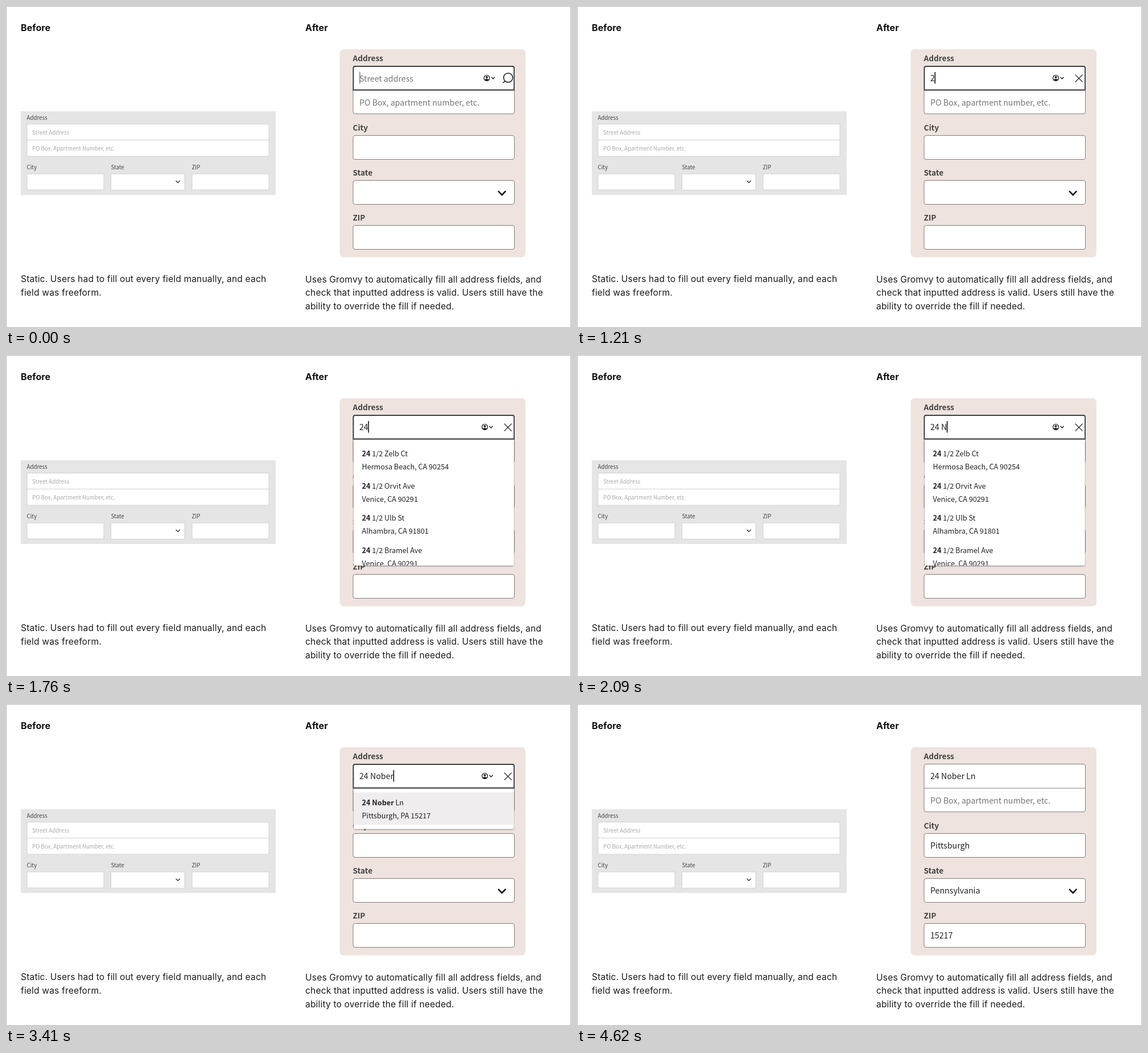
An HTML page for the animation above (7.59 s loop, 993 by 564 pixels).

```html
<!DOCTYPE html>
<html lang="en">
<head>
<meta charset="utf-8">
<title>Address form, before and after</title>
<style>
  html, body { margin: 0; width: 100%; height: 100%; overflow: hidden; background: #fff; }
  svg { display: block; width: 993px; height: 564px; }
  text { white-space: pre; }
  .copy { font: 15.6px/1 Inter, sans-serif; letter-spacing: .15px; fill: #1c1c1c; }
  .head { font: 700 16px/1 Inter, sans-serif; letter-spacing: .1px; fill: #111; }
  .form { font-family: "Noto Sans CJK JP", "Noto Sans CJK SC", "Noto Sans", sans-serif; font-size: 14.2px; fill: #222; }
  .label { font-weight: 500; fill: #444; }
  .wide { font-size: 13.6px; }
  .hint { fill: #757575; }
  .small { font-size: 9.7px; }
  .small .hint { fill: #a9a9a9; }
  .list { font-size: 12.65px; }
  .b { font-weight: 700; }
  .box { fill: #fff; stroke: #857c7a; }
  .pale { fill: #fff; stroke: #d2d2d2; }
  .line { fill: none; stroke: #111; }
</style>
</head>
<body>
<svg viewBox="0 0 993 564">
  <defs>
    <clipPath id="clip"><rect id="clipBox" x="611" y="149" width="281.5" height="221"/></clipPath>
    <filter id="shade" x="-5%" y="-5%" width="110%" height="112%">
      <feDropShadow dx="0" dy="1" stdDeviation="1" flood-opacity=".45"/>
    </filter>
  </defs>
  <rect width="993" height="564" fill="#fff"/>
  <path d="M.5 564V.5H992.5V564" fill="none" stroke="#b9b9b9"/>

  <text class="head" x="26" y="43.8">Before</text>
  <text class="head" x="526" y="43.8">After</text>
  <g class="copy">
    <text x="26" y="485">Static. Users had to fill out every field manually, and each</text>
    <text x="26" y="508.5">field was freeform.</text>
    <text x="526" y="485.5">Uses Gromvy to automatically fill all address fields, and</text>
    <text x="526" y="509">check that inputted address is valid. Users still have the</text>
    <text x="526" y="532.5">ability to override the fill if needed.</text>
  </g>

  <g class="form small">
    <rect x="26" y="185" width="448" height="147" fill="#e5e5e5"/>
    <rect class="pale" x="37" y="207.5" width="425" height="56.5"/>
    <path class="pale" d="M37 235.5H462"/>
    <rect class="pale" x="37" y="295" width="135" height="28"/>
    <rect class="pale" x="184.5" y="295" width="129.5" height="28.5"/>
    <rect class="pale" x="327" y="295" width="135" height="28"/>
    <path class="line" stroke-width="1.2" d="M298.5 306.8l3.6 3.6 3.6-3.6"/>
    <g class="label">
      <text x="36.5" y="199.5">Address</text>
      <text x="36.5" y="287">City</text>
      <text x="184.5" y="287">State</text>
      <text x="326.5" y="287">ZIP</text>
    </g>
    <text class="hint" x="46" y="225.5">Street Address</text>
    <text class="hint" x="46" y="254">PO Box, Apartment Number, etc.</text>
  </g>

  <g class="form">
    <rect x="586.5" y="76" width="326.5" height="365.5" rx="7" fill="#eee3de"/>
    <rect class="box" x="610" y="105.5" width="283.5" height="84" rx="3.5"/>
    <path class="box" d="M610 148H893.5"/>
    <rect class="box" x="610" y="227.5" width="283.5" height="42" rx="3.5"/>
    <rect class="box" x="610" y="306.5" width="283.5" height="42" rx="3.5"/>
    <rect class="box" x="610" y="385.5" width="283.5" height="42" rx="3.5"/>
    <path class="line" stroke-width="2.6" d="M865 325.2l6.6 6.6 6.6-6.6"/>
    <g class="label wide b">
      <text x="609.5" y="96.5">Address</text>
      <text x="609.5" y="218.5">City</text>
      <text x="609.5" y="297.5">State</text>
      <text x="609.5" y="376.5">ZIP</text>
    </g>
    <text class="hint" x="621" y="175">PO Box, apartment number, etc.</text>
    <g id="filled">
      <text x="621" y="254">Pittsburgh</text>
      <text x="621" y="333">Pennsylvania</text>
      <text x="621" y="412">15217</text>
    </g>
    <g id="drop">
      <rect id="sheet" x="611" y="149" width="281.5" height="221" rx="3" fill="#fff" filter="url(#shade)"/>
      <g clip-path="url(#clip)">
        <rect id="hover" x="611" y="155.5" width="281.5" height="56.5" fill="#efedee"/>
        <g id="list" class="list"></g>
      </g>
    </g>
    <g id="focus">
      <path d="M610.5 147.5V109q0-3 3-3H890q3 0 3 3V147.5Z" fill="#fff" stroke="#3b4040" stroke-width="1.8"/>
      <g id="person">
        <circle class="line" cx="841.5" cy="126.5" r="5" stroke-width="1.2"/>
        <circle cx="841.5" cy="125" r="2"/>
        <path d="M837.8 129.8q3.7-4 7.4 0q-3.7 3.2-7.4 0Z"/>
        <path class="line" stroke-width="1.3" d="M849.5 125l3 3 3-3"/>
      </g>
      <path id="cross" class="line" stroke-width="1.2" d="M875.6 120.6l13 13m0-13l-13 13"/>
      <g id="lens" class="line" stroke-width="1.5">
        <circle cx="882.6" cy="126" r="8"/>
        <path d="M877 131.7l-3.6 3.6"/>
      </g>
    </g>
    <text id="hint" class="hint" x="621" y="132.5">Street address</text>
    <text id="entry" x="621" y="132"></text>
    <rect id="caret" y="116" width="1.6" height="20.5" fill="#111"/>
  </g>
</svg>
<script>
  const LOOP = 7590;
  // Each entry: bold part | rest of street | city
  const RESULTS = {
    two: ["2| Olven Park Way|Cupertino, CA 95014", "2| Tarnwel Loop|Cupertino, CA 95014",
          "2| Fendral Way Ste (8 more entries)|Cupertino, CA 95014", "2| Fendral Way|Cupertino, CA 95014"],
    half: ["24| 1/2 Zelb Ct|Hermosa Beach, CA 90254", "24| 1/2 Orvit Ave|Venice, CA 90291",
           "24| 1/2 Ulb St|Alhambra, CA 91801", "24| 1/2 Bramel Ave|Venice, CA 90291"],
    north: ["24 N| O Tarvelle|Berkeley, CA 94720", "24| Nol|Irvine, CA 92697",
            "24| Noven Tack St|Marina del Rey, CA 90292", "24 E| Noven St|Pasadena, CA 91103"],
    one: ["24 Nober| Ln|Pittsburgh, PA 15217"]
  };
  // start ms, typed text, result list, caret opacity, first row highlighted
  const STEPS = [
    [0, "", "", .5],
    [110, "", "", 1],
    [440, "", "", .5],
    [550, "", "", 0],
    [770, "2", "", 1],
    [1100, "2", "two", 1],
    [1210, "2", "", 1],
    [1430, "24", "two", 1],
    [1760, "24", "half", 1],
    [1870, "24 ", "half", 1],
    [2090, "24 N", "half", 1],
    [2310, "24 No", "half", 1],
    [2420, "24 No", "north", 1],
    [2530, "24 Nob", "north", 1],
    [2750, "24 Nob", "north", 1, true],
    [2860, "24 Nobe", "north", 1, true],
    [2970, "24 Nober", "north", 1, true],
    [3190, "24 Nober", "one", 1, true],
    [3630, "24 Nober", "one", .5, true],
    [3740, "24 Nober", "one", 0, true],
    [4070, "24 Nober", "one", .5, true],
    [4180, "24 Nober", "one", 1, true],
    [4620, "24 Nober Ln", "", 0]
  ];

  const $ = id => document.getElementById(id);
  const show = (id, on) => $(id).setAttribute("visibility", on ? "inherit" : "hidden");

  function rows(items) {
    return items.map((item, i) => {
      const [bold, street, city] = item.split("|");
      const y = 178 + i * 56.7;
      return `<text x="625.5" y="${y}"><tspan class="b">${bold}</tspan>${street}</text>` +
             `<text x="625.5" y="${y + 23}">${city}</text>`;
    }).join("");
  }

  function draw([, typed, key, caret, hover], done) {
    const items = RESULTS[key] || [];
    const height = items.length > 1 ? 221 : 70.5;
    $("entry").textContent = typed;
    $("list").innerHTML = rows(items);
    $("sheet").setAttribute("height", height);
    $("clipBox").setAttribute("height", height);
    show("drop", items.length);
    show("hover", hover && items.length);
    show("hint", !typed);
    show("focus", !done);
    show("filled", done);
    show("cross", typed);
    show("lens", !typed);
    $("person").setAttribute("transform", `translate(${typed ? 0 : 3.5} 0)`);
    $("caret").setAttribute("opacity", caret);
    $("caret").setAttribute("x", typed ? 620.6 + $("entry").getComputedTextLength() : 621);
  }

  let last = -1;
  const start = performance.now();
  function tick(now) {
    const t = Math.max(0, now - start) % LOOP;
    const i = STEPS.findLastIndex(s => s[0] <= t);
    if (i !== last) draw(STEPS[last = i], i === STEPS.length - 1);
    requestAnimationFrame(tick);
  }
  tick(start);
</script>
</body>
</html>
```
